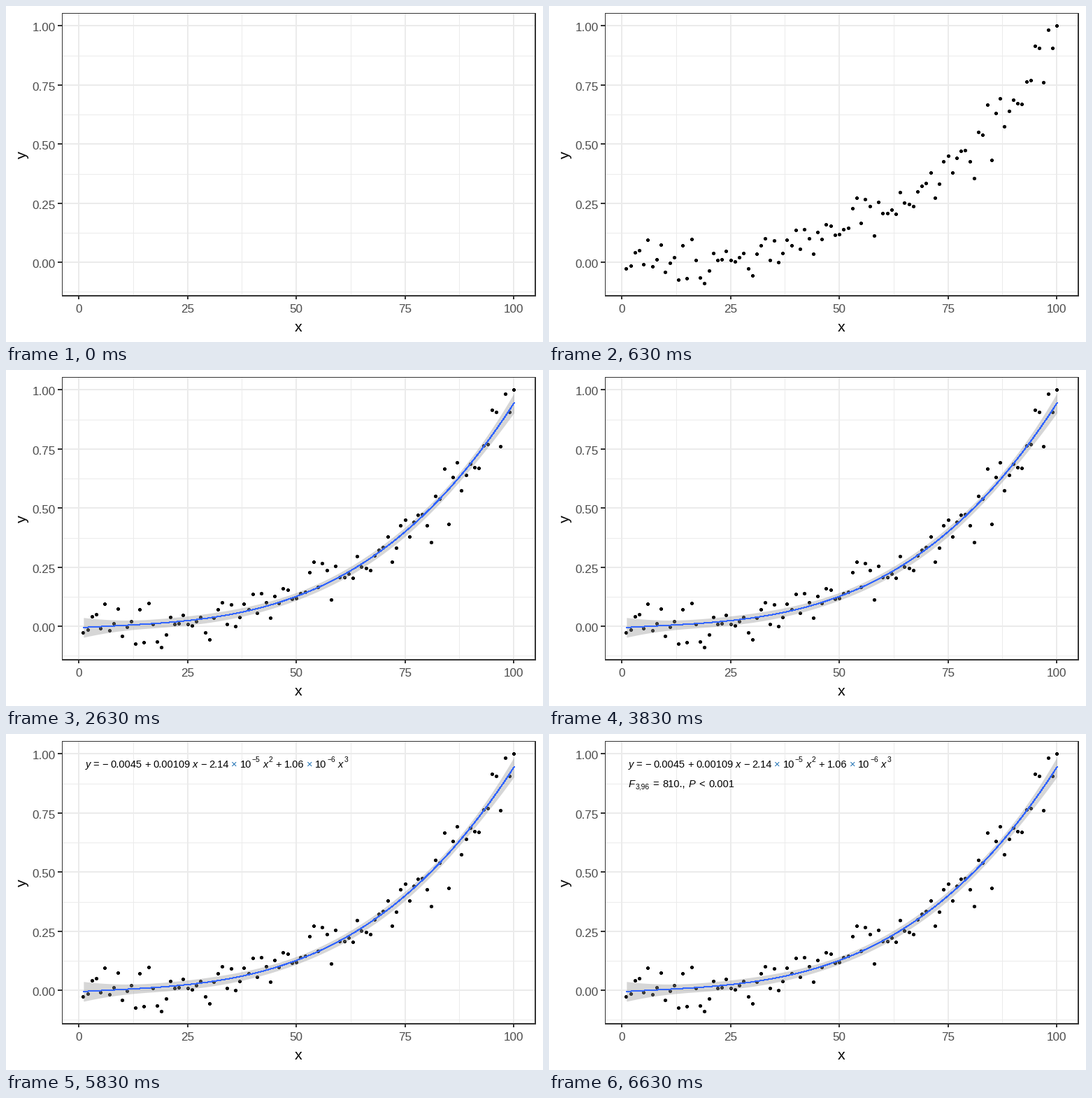
A matplotlib script that plays this animation: 768 by 480 pixels, repeating every 8 s.

```python
import math

import matplotlib.pyplot as plt
import numpy as np
from matplotlib.animation import FuncAnimation
from matplotlib.collections import PatchCollection
from matplotlib.patches import Circle, Rectangle

plt.rcParams["font.family"] = "Liberation Sans"

WIDTH, HEIGHT, DPI = 768, 480, 96
LOOP_MS, STEP_MS = 8000, 20
POINTS_AT, FIT_AT, EQUATION_AT, TEST_AT = 630, 2630, 4630, 6630
GRID, DARK, TICK_TEXT = "#EBEBEB", "#333333", "#4D4D4D"
LEFT, TOP, RIGHT, BOTTOM = 80, 10, 758, 415

fig = plt.figure(figsize=(WIDTH / DPI, HEIGHT / DPI), dpi=DPI, facecolor="white")
ax = fig.add_axes([0, 0, 1, 1])
ax.set(xlim=(0, WIDTH), ylim=(HEIGHT, 0))
ax.axis("off")


def to_px(x):
    return 104.66 + 6.2188 * x


def to_py(y):
    return 366.7 - 337.8 * y


def r_normals(seed, count):
    """Standard normals as R's set.seed() and rnorm() produce them."""
    words = []
    for _ in range(50 + 625):
        seed = (69069 * seed + 1) % 2**32
        words.append(seed)
    rng = np.random.RandomState()
    rng.set_state(("MT19937", np.array(words[51:], dtype=np.uint32), 624))
    u = rng.randint(0, 2**32, size=(count, 2), dtype=np.uint32) / 2**32
    p = (np.floor(2**27 * u[:, 0]) + u[:, 1]) / 2**27
    z = np.linspace(-5, 5, 20001)
    cdf = [0.5 + 0.5 * math.erf(v / math.sqrt(2)) for v in z]
    return np.interp(p, cdf, z)


def bar(x, y, w, h, color, z=1):
    ax.add_patch(Rectangle((x, y), w, h, fc=color, lw=0, antialiased=False, zorder=z))


def label(x, y, text, size, color="black", **kw):
    return ax.text(x, y, text, fontsize=size, color=color, va="baseline", zorder=7, **kw)


def draw_panel():
    inner_w, inner_h = RIGHT - LEFT - 2, BOTTOM - TOP - 2
    for v in np.arange(12.5, 100, 25):
        bar(int(to_px(v)), TOP + 1, 1, inner_h, GRID)
    for v in np.arange(-0.125, 1, 0.25):
        bar(LEFT + 1, int(to_py(v)), inner_w, 1, GRID)
    for v in range(0, 101, 25):
        x = int(to_px(v)) - 1
        bar(x, TOP + 1, 2, inner_h, GRID, 2)
        bar(x, BOTTOM, 2, 4, DARK)
        label(to_px(v) - 0.6, 438, str(v), 12.8, TICK_TEXT, ha="center")
    for v in np.arange(0, 1.1, 0.25):
        y = int(to_py(v)) - 1
        bar(LEFT + 1, y, inner_w, 2, GRID, 2)
        bar(LEFT - 6, y, 6, 2, DARK)
        label(71, y + 9, f"{v:.2f}", 12.8, TICK_TEXT, ha="right")
    bar(LEFT, TOP, 1, BOTTOM - TOP, DARK, 6)
    bar(LEFT, TOP, RIGHT - LEFT, 1, DARK, 6)
    bar(RIGHT - 2, TOP, 2, BOTTOM - TOP, DARK, 6)
    bar(LEFT, BOTTOM - 2, RIGHT - LEFT, 2, DARK, 6)
    label(418.3, 465, "x", 16, ha="center")
    label(29, 212.3, "y", 16, ha="center", rotation=90, rotation_mode="anchor")


def draw_points(xs, ys):
    # Aliased fills cover every touched pixel, so this radius gives 5 px dots.
    dots = [Circle((int(to_px(x)) + 0.5, int(to_py(y)) + 0.5), 2.1)
            for x, y in zip(xs, ys)]
    return [ax.add_collection(PatchCollection(
        dots, facecolor="black", linewidth=0, antialiased=False, zorder=3))]


def draw_fit(xs, ys):
    """Cubic least-squares fit with its 95 % confidence band."""
    coef, cov = np.polyfit(xs / 100, ys, 3, cov=True)
    grid = np.linspace(1, 100, 80)
    basis = np.vander(grid / 100, 4)
    mid = basis @ coef
    half = 1.985 * np.sqrt(np.sum((basis @ cov) * basis, axis=1))
    band = ax.fill_between(to_px(grid), to_py(mid - half), to_py(mid + half),
                           color="#999999", alpha=0.4, lw=0, zorder=4)
    line, = ax.plot(to_px(grid), to_py(mid), color="#3366FF", lw=0.75,
                    antialiased=False, zorder=5)
    return [band, line]


def draw_formula(baseline, formula, gap):
    """Set tokens in a row; the prefixes * ^ _ mark italic, super- and subscript."""
    shift = {"^": -8, "_": 3}
    x, artists = 113.5, []
    for token in formula.split():
        mark, text = token[0], token.lstrip("*^_")
        script = mark in shift
        if artists:
            x += 1 if script else gap
        artist = label(x, baseline + shift.get(mark, 0), text, 7.7 if script else 11,
                       "#2474B5" if text == "×" else "black",
                       style="italic" if mark == "*" else "normal")
        x += artist.get_window_extent().width
        artists.append(artist)
    return artists


xs = np.arange(1, 101)
ys = xs + xs**2 + xs**3 + r_normals(4321, 100) * np.mean(xs**3) / 4
ys /= ys.max()

draw_panel()
stages = [
    (POINTS_AT, draw_points(xs, ys)),
    (FIT_AT, draw_fit(xs, ys)),
    (EQUATION_AT, draw_formula(
        48, "*y = − 0.0045 + 0.00109 *x − 2.14 × 10 ^−5 *x ^2 + 1.06 × 10 ^−6 *x ^3", 3.7)),
    (TEST_AT, draw_formula(76, "*F _3,96 = 810., *P < 0.001", 5)),
]


def update(frame):
    now = frame * STEP_MS + STEP_MS / 2
    for start, artists in stages:
        for artist in artists:
            artist.set_visible(now >= start)
    return [artist for _, artists in stages for artist in artists]


anim = FuncAnimation(fig, update, frames=LOOP_MS // STEP_MS, interval=STEP_MS,
                     repeat=True, repeat_delay=0)
plt.show()
```
